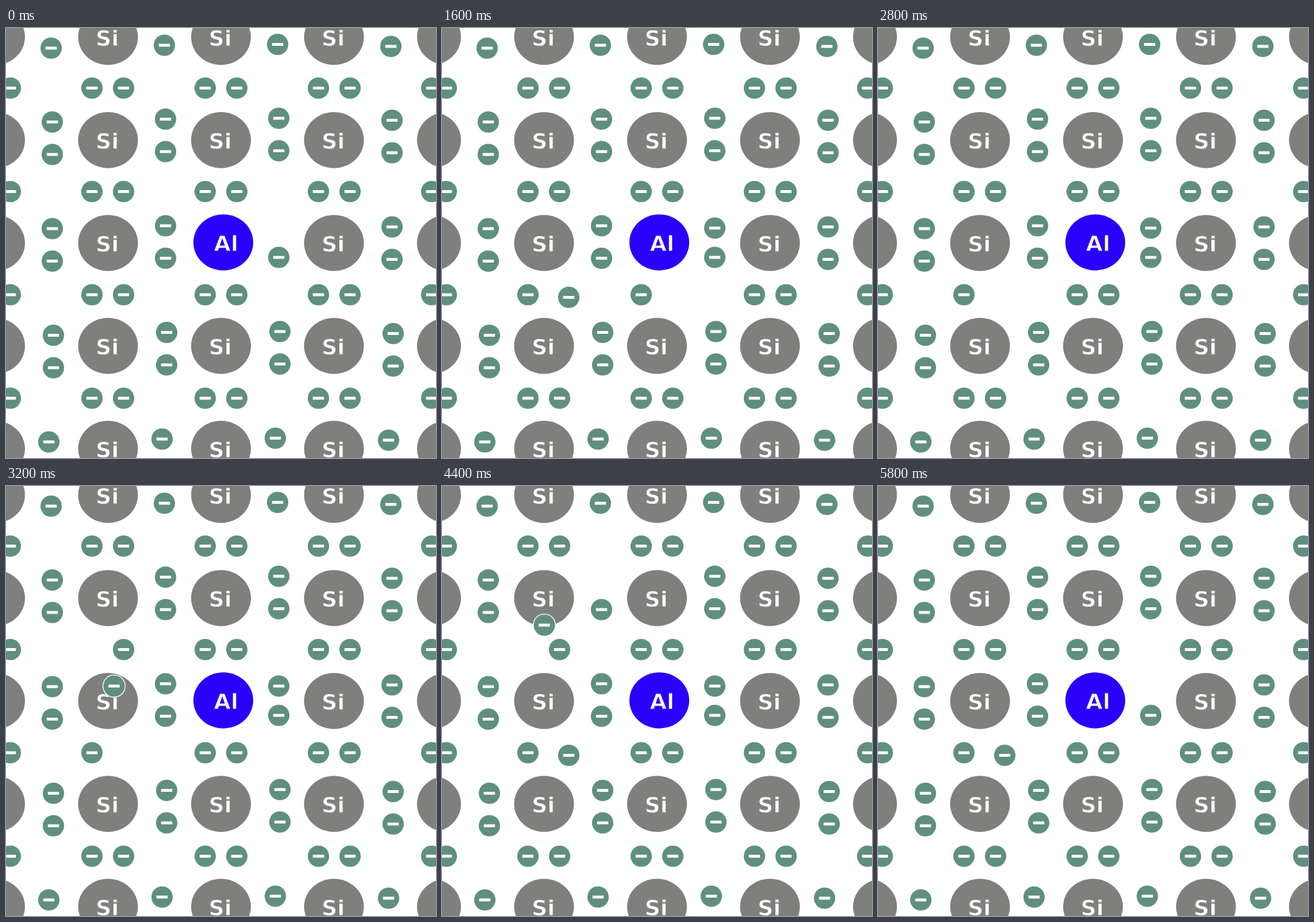
These frames come from a looping animation (748x748 px, 6000 ms). An HTML page:

```html
<!DOCTYPE html>
<html lang="en">
<head>
<meta charset="utf-8">
<title>Hole moving through a doped silicon lattice</title>
<style>
  html, body { margin: 0; width: 100%; height: 100%; overflow: hidden; background: #fff; }
  svg { display: block; width: 100%; height: 100%; }
  text { font: bold 38px "DejaVu Sans", Verdana, sans-serif; fill: #fff; stroke-width: 1px; }
</style>
</head>
<body>
<svg id="stage" viewBox="0 0 748 748"></svg>
<script>
const GREY = '#7f807d', BLUE = '#2a00fa', GREEN = '#608f80';
const LOOP = 6000, REST = 800, STEP = 200;
const stage = document.getElementById('stage');

function add(parent, tag, attrs, text) {
  const node = document.createElementNS('http://www.w3.org/2000/svg', tag);
  for (const key in attrs) node.setAttribute(key, attrs[key]);
  if (text) node.textContent = text;
  return parent.appendChild(node);
}

function atom(x, y, color, label, labelX, baseline) {
  add(stage, 'ellipse', { cx: x, cy: y, rx: 52, ry: 48.7, fill: color });
  add(stage, 'text', { x: labelX, y: baseline, stroke: color }, label);
}

function electron(x, y, ringed) {
  const group = add(stage, 'g', { transform: `translate(${x} ${y})` });
  if (ringed) add(group, 'circle', { r: 20, fill: '#fff' });
  add(group, 'circle', { r: 18.6, fill: GREEN });
  add(group, 'rect', { x: -9.7, y: -2.5, width: 19.4, height: 5, fill: '#fff' });
  return group;
}

// Each hop starts at a tick and takes one listed point per tick.
const movers = [
  { home: [401.5, 464], hops: [
    { tick: 1, points: [[416, 441], [431, 417], [445, 394], [460, 371], [474.5, 348]] },
    { tick: 24, points: [[452, 318], [426, 299], [401.5, 284.5]] }] },
  { home: [346.5, 464], hops: [
    { tick: 6, points: [[374, 464], [401.5, 464]] }] },
  { home: [204.5, 464], hops: [
    { tick: 1, points: [[220.5, 468.5]] },
    { tick: 8, points: [[247, 469.5], [281, 469], [315, 467], [346.5, 464]] }] },
  { home: [149.5, 284.5], hops: [
    { tick: 12, points: [[156, 311], [188, 348], [210, 385], [222, 426], [220.5, 468.5]] }] },
  { home: [277.5, 158.5], hops: [
    { tick: 17, points: [[249, 180], [213, 209], [178, 242], [149.5, 284.5]] }] },
  { home: [401.5, 284.5], hops: [
    { tick: 21, points: [[385, 250], [350, 215], [312, 184], [277.5, 158.5]] }] }
];
const hole = [474.5, 342.5];
const vacant = [hole, ...movers.map(m => m.home)];

function fixedElectron(x, y) {
  if (!vacant.some(([vx, vy]) => Math.hypot(vx - x, vy - y) < 2)) electron(x, y);
}

function buildLattice() {
  [15.5, 195, 374, 553, 732].forEach((y, row) => {
    for (let col = -1; col < 4; col++) {
      const x = 177.5 + 196.5 * col;
      if (row === 2 && col === 1) atom(378, 373, BLUE, 'Al', 361.5, 387.5);
      else atom(x, y, GREY, 'Si', x - 21.5, y + 15.3);
    }
  });
  for (const y of [104.5, 284.5, 464, 644]) {
    for (let col = -1; col < 4; col++) {
      fixedElectron(149.5 + 197 * col, y);
      fixedElectron(204.5 + 197 * col, y);
    }
  }
  const sites = [[78.5, 35], [80.5, 163.5], [80.5, 220], [80.5, 349],
    [80.5, 405.5], [82.5, 534.5], [82.5, 591], [74.5, 720]];
  [0, -5, -6.5, -3].forEach((lift, col) => {
    for (const [x, y] of sites) fixedElectron(x + 197 * col, y + lift);
  });
}

function positionAt(mover, tick) {
  let position = mover.home;
  for (const { tick: start, points } of mover.hops) {
    if (tick >= start) position = points[Math.min(tick - start, points.length - 1)];
  }
  return position;
}

function render(time) {
  const t = time % LOOP;
  const tick = t < REST ? 0 : Math.floor((t - REST) / STEP) + 1;
  for (const mover of movers) {
    mover.node.setAttribute('transform', `translate(${positionAt(mover, tick).join(' ')})`);
  }
}

buildLattice();
for (const mover of movers) mover.node = electron(...mover.home, true);

const began = performance.now();
function loop() {
  render(performance.now() - began);
  requestAnimationFrame(loop);
}
loop();
</script>
</body>
</html>
```
